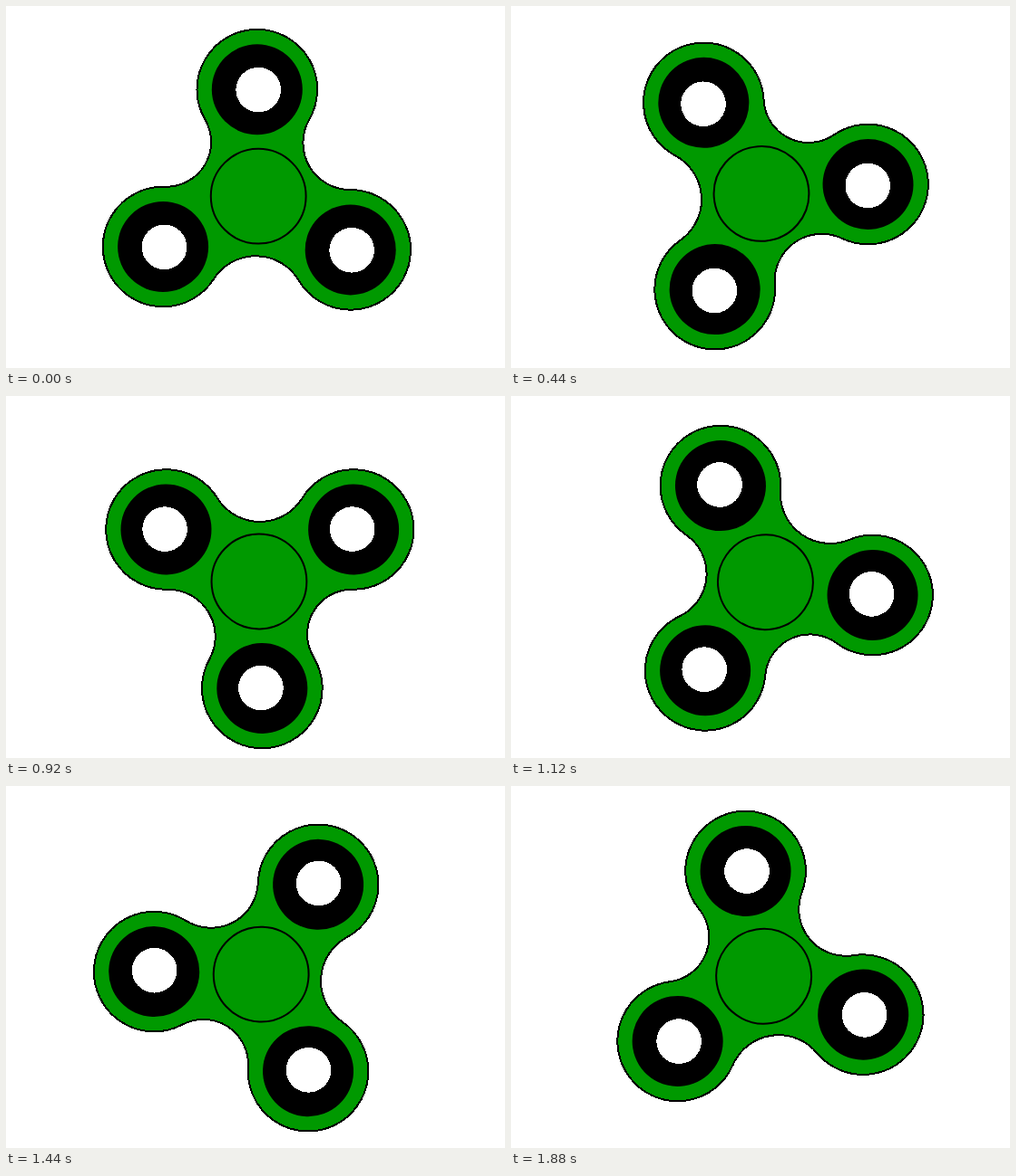
An HTML page for the animation above (1920 ms loop, 550 px wide and 400 px high).

```html
<!DOCTYPE html>
<html lang="en">
<head>
<meta charset="utf-8">
<title>Spinner</title>
<style>
  /* A registered angle is repainted at each step, so edges stay sharp */
  @property --turn {
    syntax: "<angle>";
    inherits: false;
    initial-value: 0deg;
  }

  html, body { margin: 0; width: 100%; height: 100%; overflow: hidden; background: #fff; }
  svg { display: block; width: 550px; height: 400px; }

  /* Two half turns at slightly different speeds, 40 ms per step */
  #spinner {
    transform-origin: 278.6px 207.6px;
    transform: rotate(var(--turn));
    animation: spin 1920ms infinite;
  }
  @keyframes spin {
    0% { --turn: 0deg; animation-timing-function: steps(23, end); }
    47.916% { --turn: 179.05deg; animation-timing-function: steps(24, end); }
    97.916%, 100% { --turn: 350.9deg; animation-timing-function: step-end; }
  }

  .shell { fill: #090; stroke: #000; stroke-width: 2; }
  .hole { fill: #fff; }
  #body, .hole { shape-rendering: crispEdges; }
</style>
</head>
<body>
<svg viewBox="0 0 550 400">
  <g id="spinner">
    <path id="body" class="shell"/>
    <circle class="shell" cx="278.2" cy="210.2" r="52.4"/>
  </g>
</svg>
<script>
  // Lobes in clockwise order; waist is the radius of the hollow after each one
  const lobes = [
    { x: 276.8, y: 92.2, waist: 52 },
    { x: 379.7, y: 269.4, waist: 55 },
    { x: 173.1, y: 266, waist: 49.5 }
  ];
  const lobeRadius = 66.3;
  const spinner = document.getElementById("spinner");

  // Circle that touches lobes a and b from outside the body
  function hollow(a, b) {
    const dx = b.x - a.x, dy = b.y - a.y;
    const gap = Math.hypot(dx, dy);
    const reach = Math.sqrt((lobeRadius + a.waist) ** 2 - (gap / 2) ** 2) / gap;
    return { x: (a.x + b.x) / 2 + dy * reach, y: (a.y + b.y) / 2 - dx * reach };
  }

  function touchPoint(lobe, centre, waist) {
    const k = lobeRadius / (lobeRadius + waist);
    return [lobe.x + (centre.x - lobe.x) * k, lobe.y + (centre.y - lobe.y) * k];
  }

  function addCircle(x, y, r, name) {
    const circle = document.createElementNS(spinner.namespaceURI, "circle");
    const attrs = { cx: x, cy: y, r, class: name };
    for (const key in attrs) circle.setAttribute(key, attrs[key]);
    spinner.append(circle);
  }

  const necks = lobes.map((a, i) => {
    const b = lobes[(i + 1) % lobes.length];
    const centre = hollow(a, b);
    return {
      waist: a.waist,
      from: touchPoint(a, centre, a.waist),
      to: touchPoint(b, centre, a.waist)
    };
  });
  const arcs = necks.map(({ waist, from, to }) =>
    `A${lobeRadius} ${lobeRadius} 0 1 1 ${from}A${waist} ${waist} 0 0 0 ${to}`);
  document.getElementById("body").setAttribute("d", `M${necks.at(-1).to}${arcs.join("")}Z`);

  for (const { x, y } of lobes) {
    addCircle(x, y, 50, "bearing");
    addCircle(x + 1.4, y + 0.4, 24.8, "hole");
  }
</script>
</body>
</html>
```
